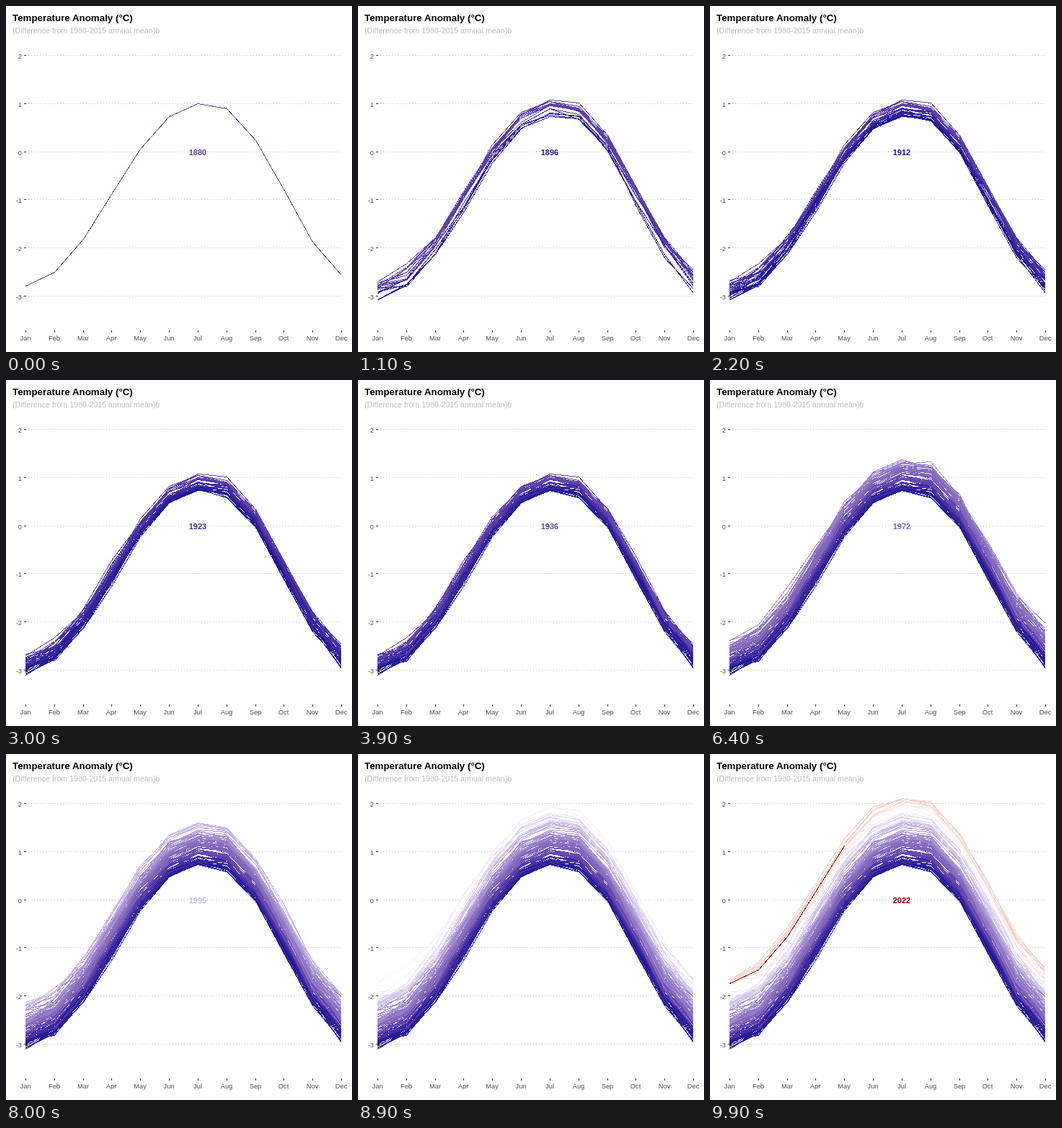
An HTML page for the animation above (10 s loop, 480 by 480 pixels).

```html
<!DOCTYPE html>
<html lang="en">
<head>
<meta charset="utf-8">
<title>Temperature Anomaly</title>
<style>
  html, body { margin: 0; width: 100%; height: 100%; overflow: hidden; background: #fff; }
  svg { display: block; width: 480px; height: 480px; font-family: "Liberation Sans", Arial, sans-serif; }
  polyline, line { fill: none; stroke-width: 1; shape-rendering: crispEdges; }
  .label { font-size: 9.33px; fill: #4d4d4d; }
</style>
</head>
<body>
<svg id="chart" viewBox="0 0 480 480"></svg>
<script>
const FIRST = 1880, LAST = 2022, LAST_MONTHS = 5, STEPS = 100, STEP_MS = 100;
const MONTHS = "Jan Feb Mar Apr May Jun Jul Aug Sep Oct Nov Dec".split(" ");

// Seasonal cycle in °C
const CYCLE = [-2.63, -2.35, -1.66, -.725, .22, .89, 1.15, 1.045, .4, -.625, -1.71, -2.41];

// Long-term trend as [year, anomaly] knots
const TREND = [[1880, -.16], [1912, -.4], [1936, -.15], [1944, .16], [1957, .05],
  [1972, .01], [1995, .45], [2018, .96], [2022, .89]];

// Evenly spaced colour stops from cold to warm
const COLDEST = -.49, STOP_GAP = .31;
const STOPS = [[0, 0, 139], [95, 65, 169], [151, 125, 198], [203, 188, 227], [255, 255, 255], [232, 185, 173]];

const chart = document.getElementById("chart");
const px = month => Math.round(27 + month * 438 / 11) + .5;
const py = value => Math.floor(202.1 - value * 66.8) + .5;

function add(tag, attrs, text = "") {
  const node = document.createElementNS("http://www.w3.org/2000/svg", tag);
  for (const key in attrs) node.setAttribute(key, attrs[key]);
  node.textContent = text;
  return chart.appendChild(node);
}

let seed = 1880;
function random() {
  seed = (seed * 1664525 + 1013904223) % 4294967296;
  return seed / 4294967296;
}
const jitter = () => random() + random() - 1;

function colorOf(anomaly) {
  const pos = Math.max(0, (anomaly - COLDEST) / STOP_GAP);
  const i = Math.min(Math.floor(pos), STOPS.length - 2);
  const mix = STOPS[i].map((c, k) => Math.round(c + (STOPS[i + 1][k] - c) * (pos - i)));
  return `rgb(${mix})`;
}

// Noise fades out at the knots, so those years follow the trend exactly
function makeYear(year) {
  const k = Math.max(1, TREND.findIndex(([y]) => y >= year));
  const [y0, a0] = TREND[k - 1], [y1, a1] = TREND[k];
  const f = (year - y0) / (y1 - y0);
  const noise = Math.sqrt(Math.max(0, Math.sin(Math.PI * f)));
  const anomaly = a0 + (a1 - a0) * f + .13 * noise * jitter();
  let drift = 0;
  const values = CYCLE.map((base, m) => {
    const spread = .22 + .08 * Math.cos(m * Math.PI / 6);
    drift = .4 * drift + .9 * jitter();
    return base + anomaly + drift * spread * noise;
  });
  return year === LAST
    ? { values: values.slice(0, LAST_MONTHS), color: "#8b0000" }
    : { values, color: colorOf(anomaly) };
}

add("text", { x: 9, y: 21, "font-size": 13.33, "font-weight": "bold" }, "Temperature Anomaly (°C)");
add("text", { x: 9, y: 38, "font-size": 10.667, fill: "#bebebe" }, "(Difference from 1980-2015 annual mean)b");

for (let v = -3; v <= 2; v++) {
  const y = py(v);
  add("line", { x1: 27, x2: 466, y1: y, y2: y, stroke: "#bebebe", "stroke-dasharray": "1 3" });
  add("line", { x1: 25, x2: 28, y1: y, y2: y, stroke: "#333" });
  add("text", { x: 22, y: y + 4, class: "label", "text-anchor": "end" }, v);
}
MONTHS.forEach((name, m) => {
  add("line", { x1: px(m), x2: px(m), y1: 450, y2: 453, stroke: "#333" });
  add("text", { x: px(m) - .5, y: 464, class: "label", "text-anchor": "middle" }, name);
});

const years = Array.from({ length: LAST - FIRST + 1 }, (_, i) => makeYear(FIRST + i));
const lines = years.map(({ values, color }) => add("polyline", {
  points: values.map((v, m) => `${px(m)},${py(v)}`).join(" "),
  stroke: color
}));
const yearLabel = add("text", { x: 266, y: 207, "font-size": 11, "font-weight": "bold", "text-anchor": "middle" });

let shown = -1;
function tick() {
  const step = Math.floor(performance.now() / STEP_MS) % STEPS;
  const last = Math.round(step * (LAST - FIRST) / (STEPS - 1));
  if (last !== shown) {
    shown = last;
    lines.forEach((line, i) => line.style.display = i <= last ? "" : "none");
    yearLabel.textContent = FIRST + last;
    yearLabel.setAttribute("fill", years[last].color);
  }
  requestAnimationFrame(tick);
}
tick();
</script>
</body>
</html>
```
